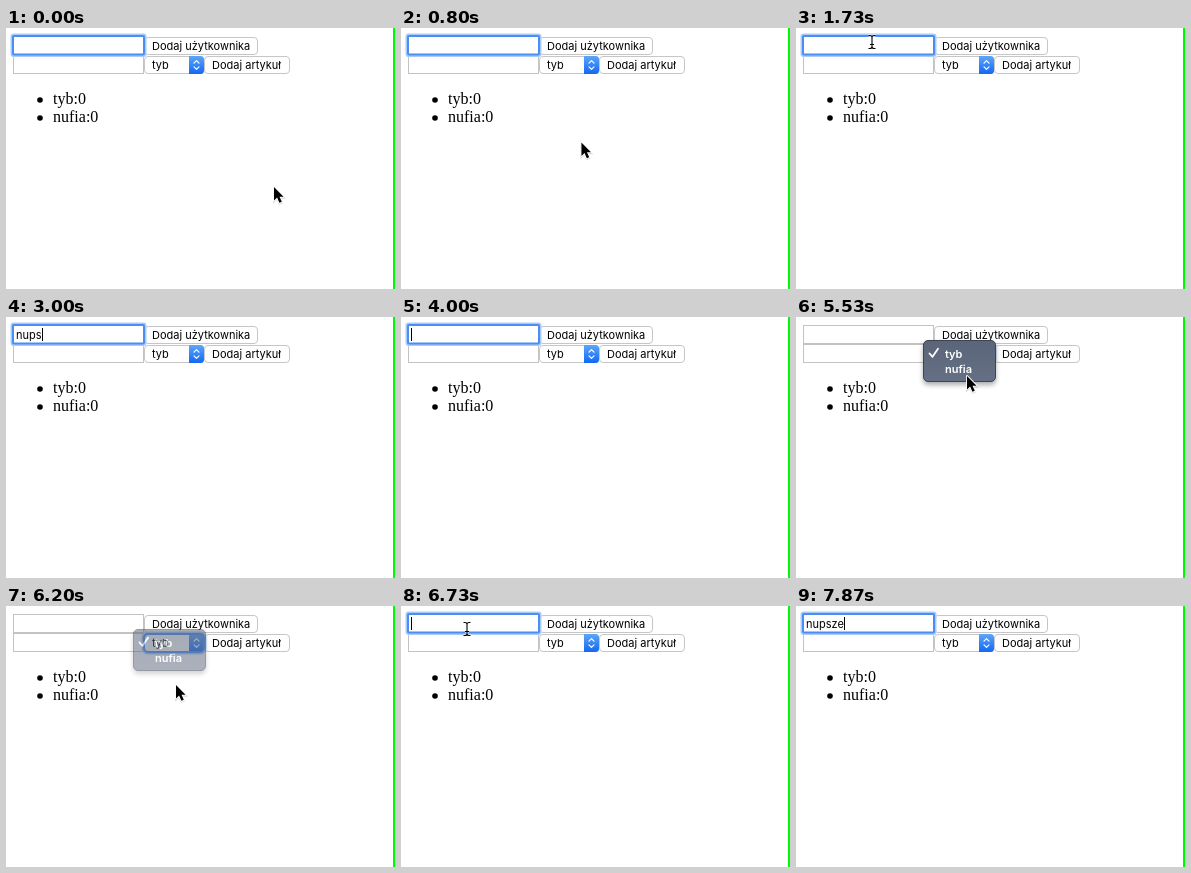
An HTML page that plays this animation: 389 px wide and 261 px high, repeating every 8000 ms.

```html
<!DOCTYPE html>
<html lang="pl">
<head>
<meta charset="utf-8">
<title>Formularz</title>
<style>
  html, body { margin: 0; width: 100%; height: 100%; overflow: hidden; background: #fff; }
  svg { display: block; width: 389px; height: 261px; }
  text { white-space: pre; }
  .ui { font: 11px Inter, "Liberation Sans", sans-serif; }
  .bold { font-weight: 600; fill: #fff; }
  .list { font: 16px "Liberation Serif", "Noto Serif", serif; }
  .field { fill: #fff; stroke: #c3c3c3; }
  .button { fill: #fff; stroke: #c6c6c6; }
  .ring rect { fill: none; }
</style>
</head>
<body>
<svg viewBox="0 0 389 261" xmlns="http://www.w3.org/2000/svg">
  <defs>
    <linearGradient id="slate" x1="0" y1="0" x2="0" y2="1">
      <stop offset="0" stop-color="#5b6579"/>
      <stop offset="1" stop-color="#667084"/>
    </linearGradient>
    <linearGradient id="blue" x1="0" y1="0" x2="0" y2="1">
      <stop offset="0" stop-color="#5ca6fa"/>
      <stop offset="1" stop-color="#1268f3"/>
    </linearGradient>
    <filter id="soft" x="-20%" y="-20%" width="140%" height="160%">
      <feGaussianBlur stdDeviation="2.4"/>
    </filter>
  </defs>
  <rect width="389" height="261" fill="#fff"/>
  <rect x="387" width="2" height="261" fill="#00f900"/>

  <rect class="field" x="7.5" y="8.5" width="130" height="18"/>
  <rect class="field" x="7.5" y="27.5" width="130" height="18"/>

  <rect class="button" x="138.5" y="9.5" width="113" height="17" rx="3.5"/>
  <text class="ui" x="146" y="22">Dodaj użytkownika</text>
  <rect class="button" x="198.5" y="28.5" width="85" height="17" rx="3.5"/>
  <text class="ui" x="206" y="41">Dodaj artykuł</text>

  <rect id="body" class="button" x="138.5" y="28.5" width="59" height="17" rx="3.5"/>
  <path id="knob" d="M183 28H194.5Q198 28 198 31.5V42.5Q198 46 194.5 46H183Z"/>
  <path d="M188 35.2L190.5 32.7L193 35.2M188 38.8L190.5 41.3L193 38.8" fill="none" stroke="#fff" stroke-width="1.2" stroke-linecap="round" stroke-linejoin="round"/>
  <text class="ui" x="146" y="41">tyb</text>

  <g id="inputRing" class="ring">
    <rect x="6" y="7" width="133" height="20.5" rx="1.5" stroke="#a9cbfa" stroke-width="3"/>
    <rect x="7" y="8" width="131" height="18.5" rx="1" stroke="#4b8df0" stroke-width="2"/>
  </g>
  <g id="selectRing" class="ring">
    <rect x="137" y="27" width="62" height="20" rx="4.5" stroke="#a9cbfa" stroke-width="3"/>
    <rect x="138" y="28" width="60" height="18" rx="4" stroke="#4b8df0" stroke-width="2"/>
  </g>
  <text id="typed" class="ui" x="10" y="22"></text>
  <rect id="caret" y="11" width="1" height="13"/>

  <circle cx="34" cy="72" r="2.8"/>
  <text class="list" x="47" y="76">tyb:0</text>
  <circle cx="34" cy="90" r="2.8"/>
  <text class="list" x="47" y="94">nufia:0</text>

  <g id="menu">
    <rect x="127" y="26" width="73" height="42" rx="5" fill="#000" opacity=".32" filter="url(#soft)"/>
    <rect x="127.5" y="23.5" width="72" height="41" rx="4.5" fill="url(#slate)" stroke="#3c4454"/>
    <path d="M133.5 36.5L136.5 39.8L142 31.8" fill="none" stroke="#fff" stroke-width="1.8" stroke-linecap="round" stroke-linejoin="round"/>
    <text class="ui bold" x="149" y="40.5">tyb</text>
    <text class="ui bold" x="149" y="56">nufia</text>
  </g>

  <g id="pointer">
    <g id="arrow">
      <path d="M0 1V14.5L3.1 11.6L5.4 16.8L7.8 15.8L5.5 10.7H9.6Z" stroke="#000" stroke-width="2" opacity=".14"/>
      <path d="M0 0V13.5L3.1 10.6L5.4 15.8L7.8 14.8L5.5 9.7H9.6Z" stroke="#fff" stroke-width="1.8" stroke-linejoin="round" paint-order="stroke"/>
    </g>
    <g id="beam" fill="none">
      <path d="M-3.5 -6.5H-2Q0 -6.5 0 -4.5V4.5Q0 6.5 -2 6.5H-3.5M3.5 -6.5H2Q0 -6.5 0 -4.5V4.5Q0 6.5 2 6.5H3.5M-2 2.5H2" stroke="#fff" stroke-width="2.4" opacity=".8"/>
      <path d="M-3.5 -6.5H-2Q0 -6.5 0 -4.5V4.5Q0 6.5 -2 6.5H-3.5M3.5 -6.5H2Q0 -6.5 0 -4.5V4.5Q0 6.5 2 6.5H3.5M-2 2.5H2" stroke="#000" stroke-width="1.1"/>
    </g>
  </g>
</svg>
<script>
const LOOP = 8000;
const NAME = "nupsze";

// time, x, y of the pointer tip
const path = [
  [0, 268, 159], [40, 268, 159], [600, 182, 116],
  [760, 182, 116], [1330, 76, 14],
  [4000, 76, 14], [4530, 161, 47],
  [4830, 161, 47], [5100, 172, 31],
  [5260, 172, 31], [5530, 171, 59],
  [5760, 171, 59], [6080, 170, 79],
  [6230, 170, 79], [6600, 66, 23], [LOOP, 66, 23]
];

// time, number of letters in the field
const typing = [
  [0, 0], [2270, 1], [2400, 2], [2470, 4], [2670, 5],
  [3000, 4], [3130, 3], [3270, 2], [3470, 1], [3600, 0],
  [7200, 1], [7330, 2], [7400, 3], [7530, 4], [7670, 5], [7870, 6]
];

const caretOn = [[270, 800], [1230, 1730], [2270, 4170], [6730, LOOP]];

const $ = id => document.getElementById(id);
const between = (t, a, b) => t >= a && t < b;
const show = (id, on) => $(id).setAttribute("visibility", on ? "visible" : "hidden");
const ease = p => p * p * (3 - 2 * p);

function pointerAt(t) {
  const i = path.findIndex(k => k[0] > t);
  const [t0, x0, y0] = path[i - 1];
  const [t1, x1, y1] = path[i];
  const p = ease((t - t0) / (t1 - t0));
  return [x0 + (x1 - x0) * p, y0 + (y1 - y0) * p];
}

function drawPointer(t) {
  const hidden = between(t, 2270, 4040) || t >= 7200;
  const [x, y] = pointerAt(t);
  const overField = between(x, 7, 138) && between(y, 8, 46);
  $("pointer").setAttribute("transform", `translate(${x.toFixed(2)} ${y.toFixed(2)})`);
  show("arrow", !hidden && !overField);
  show("beam", !hidden && overField);
}

function drawField(t) {
  const focused = t < 4500 || t >= 6730;
  const count = typing.filter(k => k[0] <= t).pop()[1];
  const typed = $("typed");
  typed.textContent = NAME.slice(0, count);
  const end = count ? typed.getComputedTextLength() : 0;
  $("caret").setAttribute("x", Math.round(10 + end));
  show("caret", focused && caretOn.some(([a, b]) => between(t, a, b)));
  show("inputRing", focused);
}

function drawSelect(t) {
  const pressed = between(t, 5120, 5220);
  $("body").style.fill = pressed ? "#e9e9e9" : "#fff";
  $("knob").setAttribute("fill", pressed ? "#1b66dc" : "url(#blue)");
  show("selectRing", between(t, 5220, 6730));

  const fade = Math.min(1, Math.max(0, (6320 - t) / 220));
  show("menu", between(t, 5220, 6320));
  $("menu").setAttribute("opacity", fade);
}

function draw(t) {
  drawField(t);
  drawSelect(t);
  drawPointer(t);
}

const start = performance.now();
function tick() {
  draw((performance.now() - start) % LOOP);
  requestAnimationFrame(tick);
}
draw(0);
requestAnimationFrame(tick);
</script>
</body>
</html>
```
